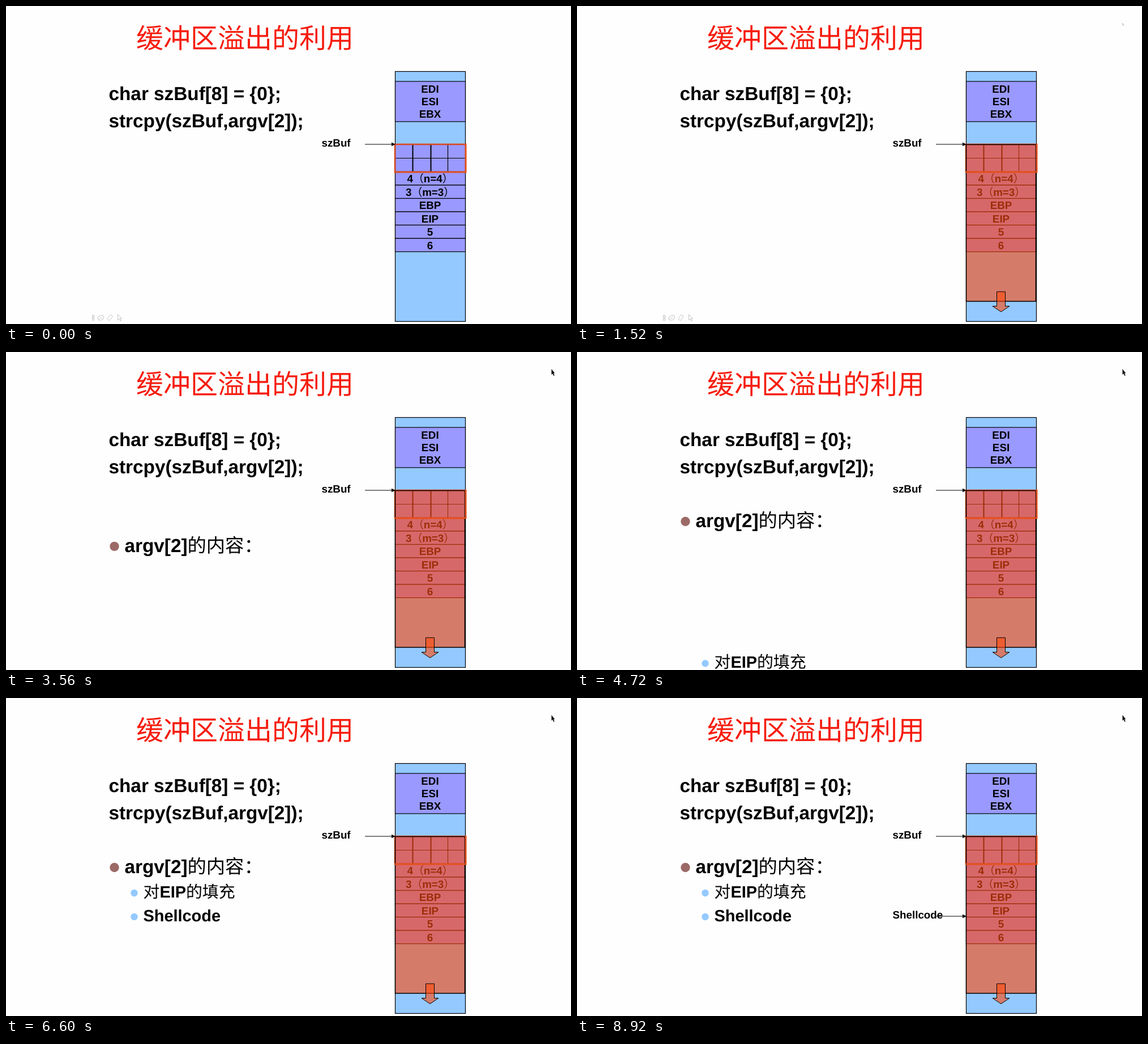
Write an HTML page that moves like this. It is 998 px wide and 561 px high and loops after 8.96 s.

```html
<!DOCTYPE html>
<html lang="zh-CN">
<head>
<meta charset="utf-8">
<title>缓冲区溢出的利用</title>
<style>
  html, body { margin: 0; height: 100%; overflow: hidden; background: #fefefe; }
  svg { display: block; width: 998px; height: 561px; font: bold 18.8px "Liberation Sans", Arial, sans-serif; text-rendering: geometricPrecision; }
  .han { font-family: "Noto Sans CJK SC", "Noto Sans CJK", sans-serif; font-weight: 500; }
  .title { font-size: 48px; font-weight: 400; fill: #f61c0d; }
  .big { font-size: 33.3px; }
  .sub { font-size: 28.9px; }
  .paren { font-weight: 400; }
  .blue { fill: #94c9ff; }
  .violet { fill: #9999ff; }
  .line { stroke: #000; stroke-width: 1.2; }
  .tools { fill: none; stroke: #c4c4c4; }
  .spill { fill: #ff4a0c; fill-opacity: .61; stroke: #000; }
</style>
</head>
<body>
<svg viewBox="0 0 998 561">
  <defs>
    <clipPath id="wipe"><rect id="wipeBox" x="680" y="243" width="140" height="0"/></clipPath>
    <g id="pointer">
      <path class="line" d="M634 0H683"/>
      <path d="M688 0l-7-3.2v6.4z"/>
    </g>
  </defs>

  <text class="han title" x="230" y="73.5">缓冲区溢出的利用</text>
  <text class="big" x="181.5" y="166">char szBuf[8] = {0};</text>
  <text class="big" x="181.5" y="214">strcpy(szBuf,argv[2]);</text>

  <rect class="blue line" x="687.5" y="115.5" width="124" height="441"/>
  <g id="stack" text-anchor="middle"></g>
  <path class="line" d="M687 268.5H811M780.5 244V292"/>
  <path d="M718.5 244V292M750.5 244V292" stroke="#000" stroke-width="2"/>
  <rect x="687" y="244" width="125" height="49" fill="none" stroke="#d9481c" stroke-width="2.6"/>

  <g class="spill" clip-path="url(#wipe)">
    <rect x="687.5" y="244.5" width="123" height="276.5" stroke-width="1.5"/>
    <path d="M741.5 504H756.5V529.5H764L749 539.5L734 529.5H741.5Z"/>
  </g>
  <path id="edge" d="M812 243V293H686" fill="none" stroke="#e5501c" stroke-width="2.6"/>

  <text x="557.5" y="248">szBuf</text>
  <use href="#pointer" y="244"/>
  <g id="label">
    <text x="557.5" y="389">Shellcode</text>
    <use href="#pointer" y="385"/>
  </g>

  <g id="argv">
    <circle cx="191.5" cy="299" r="8.2" fill="#9c6a66"/>
    <text class="big" x="209.5" y="309">argv[2]<tspan class="han">的内容：</tspan></text>
  </g>
  <g id="fill">
    <circle class="blue" cx="226.5" cy="344" r="6.2"/>
    <text class="sub" x="242.5" y="352"><tspan class="han">对</tspan>EIP<tspan class="han">的填充</tspan></text>
  </g>
  <g id="shell">
    <circle class="blue" cx="226.5" cy="386" r="6.2"/>
    <text class="sub" x="242.5" y="394">Shellcode</text>
  </g>

  <g id="tools" class="tools">
    <path d="M152.500 545.500h3v9h-3zM152.500 548.500h3M152.500 551.500h3"/>
    <ellipse cx="167.500" cy="550" rx="5.500" ry="4" transform="rotate(-25 167.500 550)"/>
    <path d="M165 552l4-3M178.500 551.500l6-7 4 3-6 7.500zM197.500 544v10l2.500-2 2 4 1.500-1-2-3.500h3z"/>
  </g>
  <path id="speck" d="M963 31h1.500v1.500h-1.500zM965 33.500h1.200v1.200h-1.200z" fill="#777"/>
  <path id="cursor" d="M963.500 30v10l2-1.800 1.800 3.800 1.600-.8-1.800-3.600h2.400z" fill="#111"/>
</svg>
<script>
const LOOP = 8960, STEP = 500;
const el = id => document.getElementById(id);

// Stack rows: top, height, lines of text
const paren = s => `<tspan class="han paren">${s}</tspan>`;
const rows = [
  [133, 71, "EDI", "ESI", "EBX"],
  [244, 48.5],
  [292.5, 23.5, `4${paren("（")}n=4${paren("）")}`],
  [316, 23.5, `3${paren("（")}m=3${paren("）")}`],
  [339.5, 23.5, "EBP"],
  [363, 23.5, "EIP"],
  [386.5, 23.5, "5"],
  [410, 23.5, "6"]
];
el("stack").innerHTML = rows.map(([top, height, ...lines]) =>
  `<rect class="violet line" x="687.5" y="${top}" width="124" height="${height}"/>` +
  lines.map((s, i) => `<text x="749" y="${top + (lines.length > 1 ? 19.5 : 18.5) + i * 22.3}">${s}</text>`).join("")
).join("");

const progress = (t, start) => Math.min(1, Math.max(0, (t - start) / STEP));
const show = (id, on) => el(id).setAttribute("visibility", on ? "visible" : "hidden");

function flyIn(id, t, start, distance) {
  el(id).setAttribute("transform", `translate(0 ${distance * (1 - progress(t, start))})`);
  show(id, t >= start);
}

function draw(now) {
  const t = now % LOOP;
  el("wipeBox").setAttribute("height", 298 * progress(t, 420));
  flyIn("argv", t, 3138, 285);
  flyIn("fill", t, 4660, 234);
  flyIn("shell", t, 6020, 192);
  show("label", t >= 7700);
  show("tools", t < 2720);
  show("speck", t >= 440 && t < 2720);
  show("cursor", t >= 2720);
  requestAnimationFrame(draw);
}
draw(performance.now());
</script>
</body>
</html>
```
